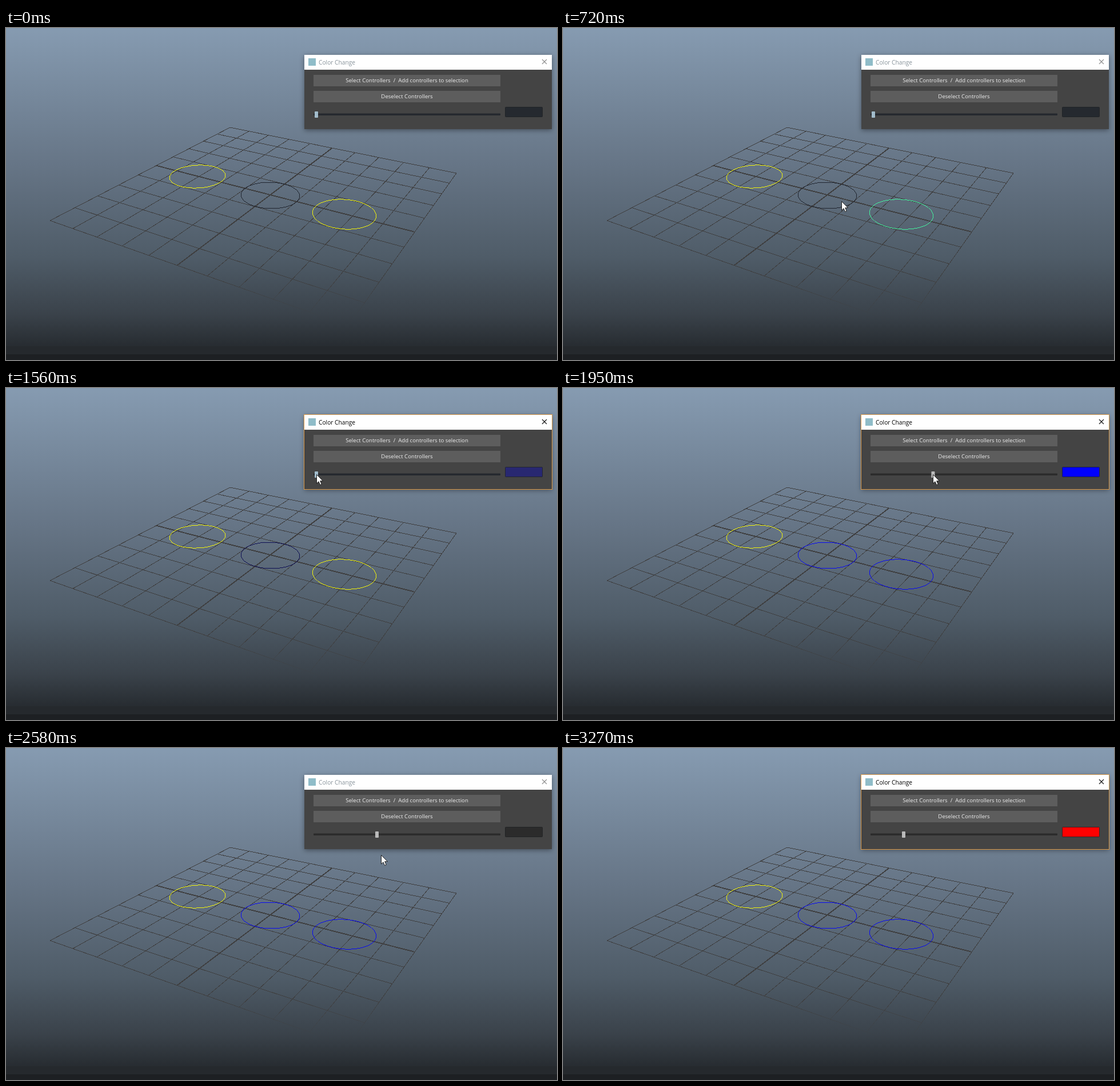
Write an HTML page that moves like this. It is 964 px wide and 581 px high and loops after 3570 ms.

```html
<!DOCTYPE html>
<html lang="en">
<head>
<meta charset="utf-8">
<title>Color Change</title>
<style>
  html, body { margin: 0; width: 100%; height: 100%; overflow: hidden; background: #1d2023; }
  svg { display: block; width: 964px; height: 581px; }
  text { font-family: "Open Sans", "Noto Sans", sans-serif; }
  .label { font-size: 9.65px; fill: #eee; text-anchor: middle; }
  .title { font-size: 10.2px; }
  .wire { fill: none; stroke-width: .9; shape-rendering: crispEdges; }
  #grid { stroke: url(#fade); fill: none; shape-rendering: crispEdges; }
  #panel { filter: drop-shadow(0 2px 4px rgba(0, 0, 0, .4)); }
</style>
</head>
<body>
<svg viewBox="0 0 964 581">
  <defs>
    <linearGradient id="sky" gradientUnits="userSpaceOnUse" x1="0" y1="0" x2="0" y2="557">
      <stop offset="0" stop-color="#869bb1"/>
      <stop offset=".43" stop-color="#667586"/>
      <stop offset=".72" stop-color="#4f5c68"/>
      <stop offset=".9" stop-color="#3a424a"/>
      <stop offset="1" stop-color="#272c31"/>
    </linearGradient>
    <linearGradient id="fade" gradientUnits="userSpaceOnUse" x1="0" y1="440" x2="0" y2="512">
      <stop offset="0" stop-color="#3f3f40"/>
      <stop offset="1" stop-color="#3f3f40" stop-opacity="0"/>
    </linearGradient>
  </defs>

  <rect width="964" height="557" fill="url(#sky)"/>
  <rect y="557" width="964" height="14" fill="#25292d"/>
  <rect y="571" width="964" height="10" fill="#1d2023"/>

  <g id="grid"></g>
  <ellipse class="wire" cx="335" cy="260" rx="49" ry="20" transform="rotate(-2.8 335 260)" stroke="#ff0"/>
  <ellipse id="middle" class="wire" cx="462.5" cy="293" rx="51.5" ry="23" transform="rotate(1.5 462.5 293)"/>
  <ellipse id="right" class="wire" cx="592" cy="326" rx="56" ry="26" transform="rotate(4 592 326)"/>

  <g id="panel">
    <rect x="522" y="47" width="433" height="130" fill="#444"/>
    <rect x="522" y="47" width="433" height="26" fill="#fff"/>
  </g>
  <rect id="frame" x="521.5" y="46.5" width="434" height="131" fill="none" stroke="#dc9a48"/>
  <rect x="529" y="53" width="13" height="13" fill="#8fbcc8"/>
  <text id="title" class="title" x="547" y="63.5">Color Change</text>
  <path id="close" d="M938 55L946 63M946 55L938 63" stroke-width="1.1"/>

  <rect id="select" x="538" y="82" width="327" height="20"/>
  <text class="label" x="701.5" y="95">Select Controllers&nbsp; /&nbsp; Add controllers to selection</text>
  <rect id="deselect" x="538" y="110" width="327" height="20"/>
  <text class="label" x="701.5" y="123">Deselect Controllers</text>

  <rect id="groove" x="538" y="149.5" width="327" height="3.5" rx="1"/>
  <rect id="handle" y="146" width="6" height="11" rx="1"/>
  <rect id="swatch" x="873.5" y="138.5" width="65" height="17" rx="1" stroke="#1b1d20" stroke-opacity=".7"/>

  <path id="cursor" d="M.5 .5V16L4 12.700 6.600 18.500 9.200 17.400 6.700 11.700H11.500Z" fill="#fff" stroke="#111" stroke-width=".9"/>
</svg>
<script>
const LOOP = 3570, TICK = 30;
const $ = id => document.getElementById(id);
const paint = (id, attrs) => {
  for (const name in attrs) $(id).setAttribute(name, attrs[name]);
};

// Perspective map of the unit square onto the floor corners.
const [[ax, ay], [bx, by], [cx, cy], [dx, dy]] = [[392, 174], [788, 254], [599, 521], [77, 337]];
const sx = ax - bx + cx - dx, sy = ay - by + cy - dy;
const den = (bx - cx) * (dy - cy) - (dx - cx) * (by - cy);
const g = (sx * (dy - cy) - (dx - cx) * sy) / den;
const h = ((bx - cx) * sy - sx * (by - cy)) / den;
function project(u, v) {
  const w = 1 + g * u + h * v;
  const x = (bx - ax + g * bx) * u + (dx - ax + h * dx) * v + ax;
  const y = (by - ay + g * by) * u + (dy - ay + h * dy) * v + ay;
  return `${x / w} ${y / w}`;
}
let lines = "";
for (let i = 0; i <= 10; i++) {
  const k = i / 10, width = i === 5 ? 1.9 : 1;
  lines += `<path stroke-width="${width}" d="M${project(k, 0)}L${project(k, 1)}M${project(0, k)}L${project(1, k)}"/>`;
}
$("grid").innerHTML = lines;

// Moments of the clicks and drags.
const PICK_RIGHT = 390, PICK_MIDDLE = 930, ADD = 1260, CLEAR = 1380;
const DRAG = 1560, DROP = 1980, REPICK = 2130, REMOVE = 2310, CLEAR_AGAIN = 2460;
const DRAG_BACK = 2640, DROP_BACK = 3000;
const KNOB_MIN = 543, KNOB_MAX = 649, KNOB_END = 596, RAIL = 151;

// Time and place of the pointer tip where it turns or rests.
const pointer = [
  [60, 727, 499], [PICK_RIGHT, 602, 350], [720, 487, 303], [900, 487, 303],
  [1110, 745, 38], [1200, 758, 89], [CLEAR, 625, 235],
  [DRAG, KNOB_MIN, RAIL], [DROP, KNOB_MAX, RAIL],
  [REPICK, 505, 310], [2280, 678, 126], [2490, 668, 252],
  [DRAG_BACK, KNOB_MAX, RAIL], [DROP_BACK, KNOB_END, RAIL], [3060, 605, 141], [3270, 884, 581]
];

function tipAt(t) {
  if (t <= pointer[0][0]) return pointer[0].slice(1);
  const i = pointer.findIndex(key => key[0] > t);
  if (i < 0) return pointer[pointer.length - 1].slice(1);
  const [t0, ...from] = pointer[i - 1], [t1, ...to] = pointer[i];
  const p = (t - t0) / (t1 - t0), e = p * p * (3 - 2 * p);
  return from.map((a, n) => a + (to[n] - a) * e);
}

function knobAt(t) {
  if (t < DRAG) return KNOB_MIN;
  if (t >= DROP && t < DRAG_BACK) return KNOB_MAX;
  return t < DROP_BACK ? tipAt(t)[0] : KNOB_END;
}

// Ten slider notches running from navy through red to blue.
function colorAt(knob) {
  const p = Math.round((knob - KNOB_MIN) / (KNOB_MAX - KNOB_MIN) * 10) / 10;
  const hue = 240 + 120 * p + 240 * p * p;
  return `hsl(${hue}, ${Math.min(100, 48 + 104 * p)}%, ${Math.min(50, 30 + 40 * p)}%)`;
}

const stepAt = (t, ...steps) => steps.filter(s => s[0] <= t).pop()[1];
const within = (t, ...spans) => spans.some(([a, b]) => t >= a && t < b);
const PICKED = "#43ffa3", YELLOW = "#ffff00", NAVY = "#06064f";

function draw(t) {
  const [tipX, tipY] = tipAt(t);
  const knob = knobAt(t), color = colorAt(knob);
  const moved = t > DRAG + 60;
  const dark = moved ? "#2b2b2b" : "#25292f";
  const tint = colorAt(knobAt(Math.min(t, DROP)));

  paint("middle", { stroke: stepAt(t, [0, "#1a1f28"], [PICK_MIDDLE, PICKED], [CLEAR, NAVY],
    [DRAG + 90, tint], [REPICK, PICKED], [CLEAR_AGAIN, tint]) });
  paint("right", { stroke: stepAt(t, [0, YELLOW], [PICK_RIGHT, PICKED], [PICK_MIDDLE, "#fff"],
    [CLEAR, YELLOW], [DRAG + 90, tint]) });

  const sliding = within(t, [DRAG, REPICK], [DRAG_BACK, LOOP]);
  const active = sliding || within(t, [ADD, CLEAR], [REMOVE, CLEAR_AGAIN]);
  paint("frame", { visibility: active ? "visible" : "hidden" });
  paint("title", { fill: active ? "#000" : "#87929a" });
  paint("close", { stroke: active ? "#111" : "#8d8d8d" });

  const hover = (id, top) => {
    const hit = tipX > 538 && tipX < 865 && tipY >= top && tipY < top + 20;
    paint(id, { fill: hit ? "#707070" : "#5d5d5d" });
  };
  hover("select", 82);
  hover("deselect", 110);

  paint("groove", { fill: dark });
  paint("handle", { x: knob - 3, fill: moved ? "#bababa" : "#a2bccb" });
  paint("swatch", { fill: sliding ? color : dark });
  paint("cursor", {
    transform: `translate(${Math.round(tipX)} ${Math.round(tipY)})`,
    visibility: within(t, [60, 3270]) ? "visible" : "hidden"
  });
}

const start = performance.now();
function loop() {
  const t = (performance.now() - start) % LOOP;
  draw(Math.floor(t / TICK) * TICK);
  requestAnimationFrame(loop);
}
loop();
</script>
</body>
</html>
```
